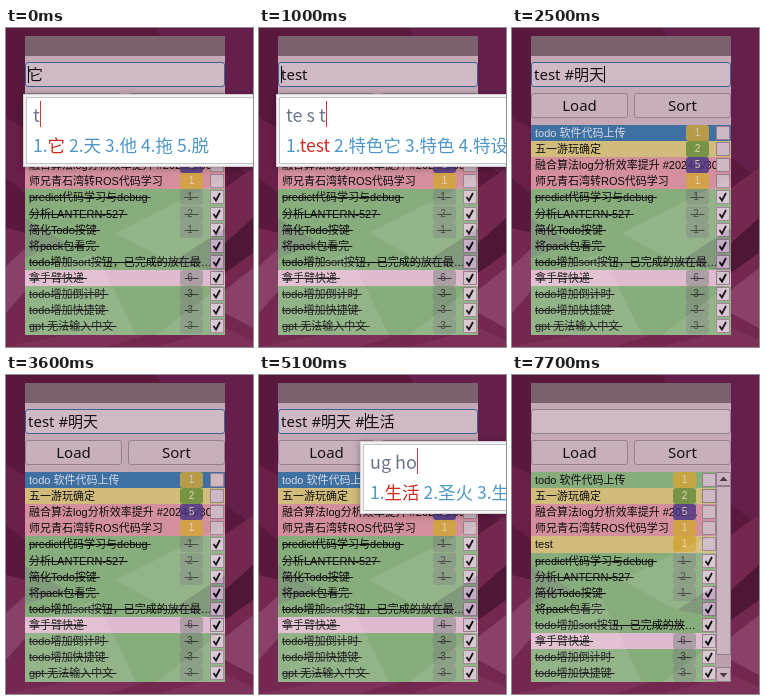
Animation, 247 px wide and 319 px high, one loop 8 s. Source, as an HTML page:

```html
<!DOCTYPE html>
<html lang="zh-CN">
<head>
<meta charset="utf-8">
<style>
html, body { margin: 0; width: 100%; height: 100%; overflow: hidden; background: #5a183c; }
#stage { position: relative; width: 247px; height: 319px; overflow: hidden; }
#stage * { position: absolute; box-sizing: border-box; }
#window { left: 19px; top: 8px; width: 200px; height: 299px; background: #c4a8b6; }
#title { width: 200px; height: 20px; background: #79626d; }
#field, .button { border: 1px solid #94808c; border-radius: 3px; color: #17101a;
  font: 15px/23px "Noto Sans", "Noto Sans CJK SC", sans-serif; white-space: pre; }
#field { left: 19px; top: 34px; width: 200px; height: 25px; padding-left: 2px; background: #ceb9c5; }
#field.focus { border-color: #3b649b; }
#field span { position: static; }
#field #caret { position: relative; display: inline-block; width: 1px; height: 17px;
  margin-right: -1px; top: 3px; background: #000; }
.button { top: 65px; width: 97px; height: 25px; background: #c7afbc; text-align: center; }
.button span { position: relative !important; }
#list { left: 19px; top: 97px; width: 200px; height: 210px; overflow: hidden; }
.row { left: 0; width: 200px; height: 17px; color: #0c0c0c;
  font: 11px/16px "Liberation Sans", "Noto Sans CJK SC", sans-serif; }
.row .text { left: 4px; top: 0; width: 185px; overflow: hidden; white-space: pre; text-overflow: ellipsis; }
.scroll .text { width: 168px; }
.badge { left: 155px; top: 0; width: 23px; height: 16px; border-radius: 3px; opacity: .82;
  color: #e8dfc0; font-size: 10px; line-height: 16px; text-align: center; white-space: pre; }
.done .text, .done .badge { text-decoration: line-through; }
.done .badge { color: #222; }
.box { left: 185px; top: 1px; width: 14px; height: 14px; background: #cdb8c4; border: 1px solid #967f8c; }
.done .box { background: #d3c3cc; }
.box svg { left: 0; top: 0; }
.scroll .badge { left: 142px; }
.scroll .box { left: 171px; }
#bar { left: 204px; top: 97px; }
#popup { top: 66px; background: #f3f2f3; border: 1px solid #d5d0d4; box-shadow: 0 1px 7px #0005; white-space: pre;
  font-family: "Noto Sans CJK SC", "Noto Sans CJK", sans-serif; color: #4f97c8; }
#popup .inner { inset: 2px; border: 1px solid #c2c4c8; background: #fff; }
#popup .keys { left: 9px; top: 6px; font-size: 18px; line-height: 26px; color: #69768a;
  border-right: 1px solid #d33; }
#popup .words { left: 9px; top: 37px; font-size: 17.5px; line-height: 26px; }
#popup .words b { position: static; font-weight: 400; color: #cf2a20; }
#popup .mode { left: 9px; top: 8px; font-size: 18px; line-height: 26px; }
</style>
</head>
<body>
<div id="stage">
  <svg width="247" height="319">
    <path fill="#64204a" d="M150 0H247V150L219 130Z"/>
    <path fill="#74284f" d="M247 140V319H0V200L120 230Z"/>
    <path fill="#6a1f49" d="M0 90L19 100V165L0 150Z"/>
    <path fill="#4f1736" d="M219 215L247 190V225L219 245Z"/>
    <path fill="#8a4168" d="M0 238L20 220V262L0 285ZM219 262L247 240V300L219 285Z"/>
    <path fill="#7d3159" d="M0 319L60 307H140L100 319ZM150 319L219 300L247 312V319Z"/>
  </svg>
  <div id="window"><div id="title"></div></div>
  <div id="field"></div>
  <div class="button" style="left:19px">Load</div>
  <div class="button" style="left:122px"><span id="sort">Sort</span></div>
  <div id="list"></div>
  <svg id="gleam" width="247" height="307">
    <path fill="#fff" opacity=".09" d="M110 205L219 150V200L165 235ZM19 250L90 225L130 307H19ZM150 307L219 255V307Z"/>
    <path fill="#5a1a6a" opacity=".13" d="M165 235L219 200V245ZM19 190L60 215L19 230Z"/>
  </svg>
  <svg id="bar" width="15" height="210">
    <path fill="#b9a2ae" d="M0 0H15V210H0Z"/>
    <path fill="#c9b4bf" stroke="#927c89" d="M.5 .5H14.5V13.5H.5ZM.5 14.5H14.5V182.5H.5ZM.5 195.5H14.5V209.5H.5Z"/>
    <path fill="#4a3a44" d="M3.5 9L7.5 4.5L11.5 9ZM3.5 201L7.5 205.5L11.5 201Z"/>
  </svg>
  <div id="popup"></div>
</div>
<script>
const $ = id => document.getElementById(id);
const GREEN = '#88ad7d', SAND = '#d2bc7c', PINK = '#d38f9d', LILAC = '#dfbbcf';
const GOLD = '#d3a535', GREY = '#7b817b';

// text, row colour, badge number, badge colour, done
const tasks = [
  ['todo 软件代码上传', GREEN, 1, GOLD],
  ['五一游玩确定', SAND, 2, '#638b3b'],
  ['融合算法log分析效率提升 #2024/5/30', PINK, 5, '#493681'],
  ['师兄青石湾转ROS代码学习', PINK, 1, GOLD],
  ...[
    ['predict代码学习与debug', 1], ['分析LANTERN-527', 2], ['简化Todo按键', 1], ['将pack包看完'],
    ['todo增加sort按钮，已完成的放在最后面'], ['拿手臂快递', 6, LILAC], ['todo增加倒计时', 3],
    ['todo增加快捷键', 3], ['gpt 无法输入中文', 3]
  ].map(([text, n, color = GREEN]) => [text + ' ', color, n, GREY, true])
];
const added = ['test', SAND, 1, GOLD];
const sorted = [...tasks.slice(0, 4), added, ...tasks.slice(4)];

// time, committed text, preedit, typed keys, candidates
const steps = [
  [0, '', '它', 't', '它 天 他 拖 脱'],
  [400, '', '特', 'te', '特 忑 忒 铽 慝'],
  [600, '', '特色', 'te s', '特色 特使 特 忑'],
  [800, '', '特色', 'te s', '特色 特设 特殊 特'],
  [900, '', '特色它', 'te s t', '特色它 特色 特设 特'],
  [1000, '', 'test', 'te s t', 'test 特色它 特色 特设'],
  [1300, 'test'],
  [1600, 'test '],
  [1800, 'test #'],
  [2000, 'test #', '', '双拼'],
  [2100, 'test #', '吗', '双拼'],
  [2200, 'test #', '吗', 'm', '吗 没 们 每 买'],
  [2300, 'test #', '明', 'mk', '明 名 命 鸣 铭'],
  [2400, 'test #', '明天', 'mk tm', '明天 名田 明 名'],
  [2500, 'test #明天'],
  [2900, 'test #明天 '],
  [4000, 'test #明天 #'],
  [4300, 'test #明天 #', '', '双拼'],
  [4700, 'test #明天 #', '是', 'u', '是 上 说 时 谁'],
  [4800, 'test #明天 #', '生', 'ug', '生 声 省 升 胜'],
  [5000, 'test #明天 #', '生活', 'ug h', '生活 生火 生还'],
  [5100, 'test #明天 #', '生活', 'ug ho', '生活 圣火 生火'],
  [5200, 'test #明天 #生活'],
  [5400, '']
];
const blinks = [[3600, 3800], [6100, 6700], [7300, 8000]];

const tick = '<svg width="12" height="12"><path d="M2.5 6L5 9.5L9 2" fill="none" stroke="#000" stroke-width="1.8"/></svg>';

function rowHtml([text, color, n, badge, done], i, selected) {
  const style = `top:${Math.round(i * 16.1)}px;background:${selected ? '#3f70a2' : color}` +
    (selected ? ';color:#d5dbe6' : '');
  const label = done ? ` ${n}  ` : n;
  const mark = n ? `<div class="badge" style="background:${badge}${done ? '99' : ''}">${label}</div>` : '';
  return `<div class="row ${done ? 'done' : ''}" style="${style}"><div class="text">${text}</div>${mark}` +
    `<div class="box">${done ? tick : ''}</div></div>`;
}

function drawList(phase) {
  const rows = [tasks, [...tasks, added], sorted][phase];
  $('list').className = phase ? 'scroll' : '';
  $('list').innerHTML = rows.map((row, i) => rowHtml(row, i, !i && phase < 2)).join('');
  $('bar').style.display = phase ? '' : 'none';
}

function drawInput([, text, preedit = '', keys, words]) {
  $('field').innerHTML = `<span>${text}</span><span id="caret"></span><span>${preedit}</span>`;
  const popup = $('popup');
  popup.style.display = keys ? '' : 'none';
  if (!keys) return;
  const caretX = $('caret').getBoundingClientRect().left - $('stage').getBoundingClientRect().left;
  Object.assign(popup.style, {
    left: Math.round(caretX) - 5 + 'px',
    width: words ? '260px' : '120px',
    height: words ? '73px' : '41px'
  });
  const list = words && words.split(' ').map((w, i) => `${i + 1}.` + (i ? w : `<b>${w}</b>`)).join(' ');
  popup.innerHTML = '<div class="inner"></div>' + (words
    ? `<div class="keys">${keys}</div><div class="words">${list}</div>`
    : `<div class="mode">${keys}</div>`);
}

let shownStep, shownPhase;
function draw(now) {
  const t = now % 8000;
  const step = steps.findLast(s => s[0] <= t);
  const phase = t < 5400 ? 0 : t < 7700 ? 1 : 2;
  if (phase !== shownPhase) drawList(shownPhase = phase);
  if (step !== shownStep) drawInput(shownStep = step);
  $('field').className = t < 7600 ? 'focus' : '';
  $('caret').style.visibility = blinks.some(([a, b]) => t >= a && t < b) ? 'hidden' : '';
  $('sort').style.top = t >= 7400 && t < 7600 ? '1px' : '0';
  requestAnimationFrame(draw);
}
draw(performance.now());
</script>
</body>
</html>
```
